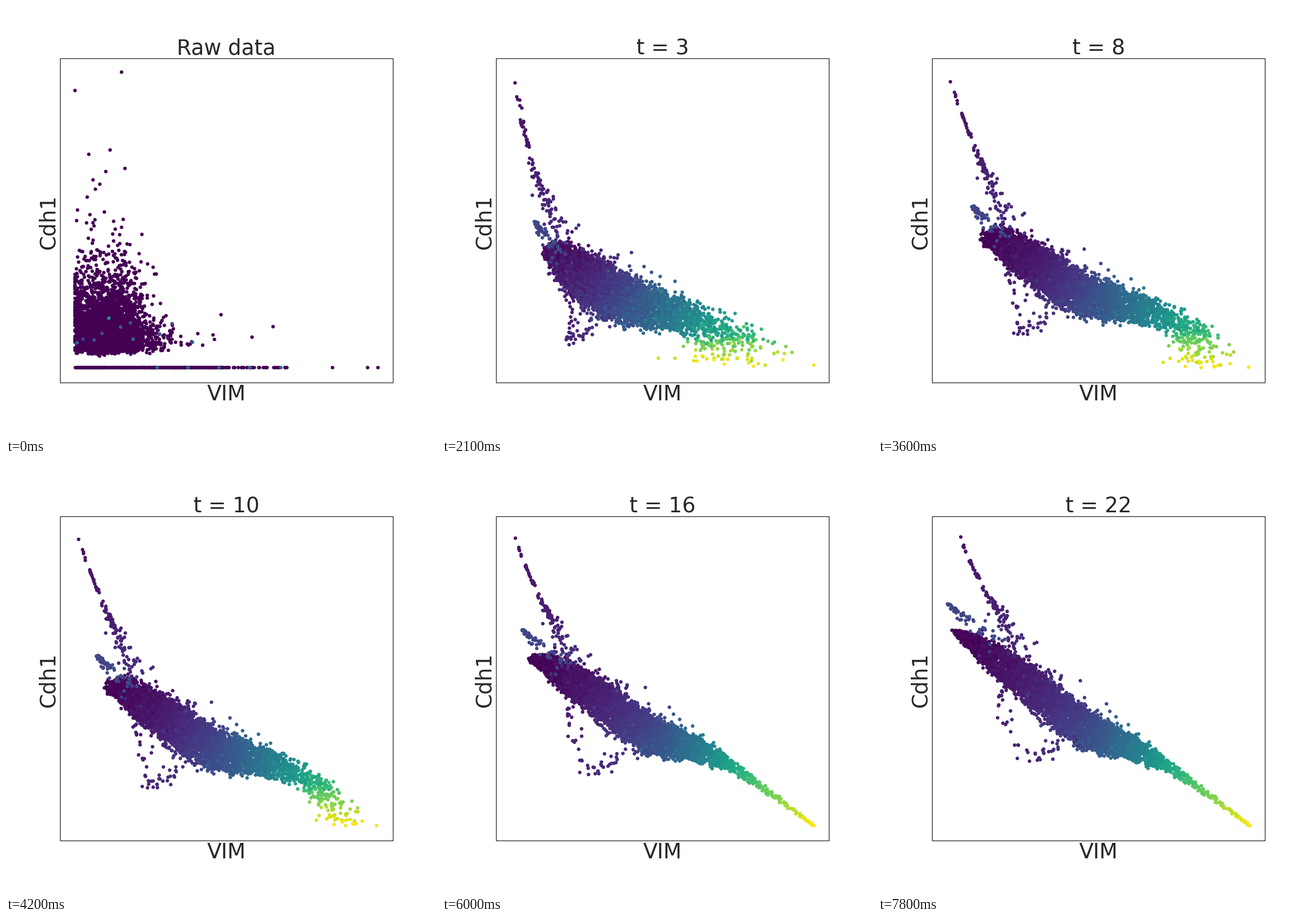
Recreate the animation shown at these times as a matplotlib script. Size 748 by 748 pixels, loop 8 s.

```python
import numpy as np
import matplotlib.pyplot as plt
from matplotlib.animation import FuncAnimation

SIZE, DPI, STEP, FRAMES = 748, 100, 100, 80
LEFT, RIGHT, TOP, BOTTOM = 94, 673, 91, 655
LOW, HIGH = (120, 115), (647, 629)
INK = "#262626"
SETTLED, LAST = 6, 22
rng = np.random.default_rng(7)
viridis = plt.get_cmap("viridis")

# Key points of each strand at three stages: start, settled, last.
BODY = [
    [(163, 405), (178, 450), (210, 490), (262, 518), (345, 545), (425, 578), (425, 614)],
    [(183, 430), (220, 422), (288, 472), (362, 515), (460, 535), (553, 572), (530, 626)],
    [(121, 284), (173, 316), (266, 385), (362, 464), (445, 496), (530, 544), (647, 629)],
]
PLUME = [
    [(126, 115), (130, 235), (140, 320), (160, 380), (185, 425)],
    [(120, 115), (152, 208), (178, 270), (195, 320), (228, 385)],
    [(123, 115), (150, 180), (180, 232), (201, 270), (235, 328)],
]
BRANCH = [
    [(150, 400), (163, 420), (185, 455)],
    [(171, 362), (186, 382), (225, 420)],
    [(121, 242), (153, 269), (215, 312)],
]
SPUR = [
    [(203, 545), (203, 567), (185, 585), (188, 592), (212, 570)],
    [(224, 465), (245, 520), (240, 575), (262, 565), (300, 545)],
    [(219, 388), (212, 432), (255, 508), (288, 503), (318, 487)],
]


def curve(knots, s):
    """Catmull-Rom spline through the knots, s from 0 to 1."""
    k = np.asarray(knots, float)
    p = np.vstack([2 * k[0] - k[1], k, 2 * k[-1] - k[-2]])
    u = s * (len(k) - 1)
    i = np.clip(u.astype(int), 0, len(k) - 2)
    f = (u - i)[:, None]
    a, b, c, d = p[i], p[i + 1], p[i + 2], p[i + 3]
    return b + .5 * f * (c - a + f * (2 * a - 5 * b + 4 * c - d
                                      + f * (3 * (b - c) + d - a)))


def strand(stages, s, widths, noise):
    """Each stage's points: s along the spline, a signed distance across it."""
    out = []
    for knots, w, sigma in zip(stages, widths, noise):
        d = curve(knots, np.minimum(s + .005, 1)) - curve(knots, np.maximum(s - .005, 0))
        normal = np.c_[d[:, 1], -d[:, 0]] / (np.hypot(*d.T)[:, None] + 1e-6)
        jitter = rng.normal(0, sigma, (len(s), 2))
        out.append(curve(knots, s) + normal * w[:, None] + jitter)
    return np.array(out)


def morph(stages, tau):
    """Blend three stages; tau runs from 0 to 2 and may vary per point."""
    a, b, c = stages
    tau = np.reshape(tau, (-1, 1))
    return np.where(tau < 1, a + (b - a) * tau, b + (c - b) * (tau - 1))


def make_body(n=4000, tail=320):
    s = np.r_[rng.beta(3.2, 4.6, n), .5 + .5 * rng.random(tail) ** 1.2]
    rng.shuffle(s)
    m = len(s)
    across = rng.uniform(-.85, .85, m) + rng.normal(0, .15, m)
    across += (rng.random(m) < .05) * rng.exponential(.35, m)
    fan = np.clip(rng.normal(0, 1, m), -1.9, 2)
    tip = s.argmax()
    s[tip], fan[tip] = 1, 2.8
    fan *= np.clip((s - .65) / .3, 0, 1)
    bell = s ** 1.6 * (1 - s) ** 2.2 / .0754
    widths = [across * (size * bell + pad)
              for size, pad in ((36, 14), (28, 11), (32, 1.5))]
    pos = strand(BODY, s, widths, (7, 3, .8))
    pos[:, :, 0] += np.outer((80, 42, 0), fan)
    return s, across, pos


def make_thin(stages, s, width, noise):
    return strand(stages, s, [rng.normal(0, .7, len(s)) * width] * 3, noise)


body_s, across, body = make_body()
tone = rng.normal(0, 1, len(body_s))
blue = .1 * (rng.random(len(body_s)) < .012)
plume_s = rng.random(115) ** .65
plume = make_thin(PLUME, plume_s, .5 + 20 * plume_s ** 2.5, (4, .8, .8))
branch_s = rng.random(60) ** 1.5
branch = make_thin(BRANCH, branch_s, 1 + 11 * branch_s, (5, .8, .8))
spur_s = rng.random(52)
spur = make_thin(SPUR, spur_s, 5 + 5 * spur_s, (8, 2, 2))
spur[:, :14] += (22, -12)
thin_tint = np.r_[.04 + .08 * plume_s,
                  .21 + rng.normal(0, .02, len(branch_s)),
                  .08 + .07 * spur_s ** 2]


def diffused(t):
    early = min(1, np.log(t) / np.log(SETTLED))
    young, late = 1 - early, max(0, t - SETTLED)
    span = LAST - SETTLED
    # The far end of the body comes to rest first.
    body_tau = early + np.minimum(1, late / (span * (1 - body_s / 2)))
    tau = early + late / span
    stem = morph(plume, tau) + (5 * max(0, t - 19), 0)
    pos = np.vstack([morph(body, body_tau), stem, morph(branch, tau), morph(spur, tau)])
    base = .08 * young
    tint = base + (1 - base) * body_s ** 2.2
    tint += blue - .03 * young * across + tone * (.012 + .025 * young)
    tint = np.clip(np.r_[tint, thin_tint], 0, 1)
    return np.clip(pos, LOW, HIGH), viridis(tint)


def raw(n=3500):
    x = 122 + abs(rng.normal(56, 35, n))
    rim = 607 - .06 * abs(x - 172) + rng.normal(0, 2, n)
    height = rng.gamma(1.8, 30, n) * np.interp(x, [120, 210, 270], [1, .95, .6])
    cloud = np.c_[x, rim - height]
    wing = np.c_[260 + rng.exponential(30, 45), 592 - rng.gamma(1.5, 14, 45)]
    zero_x = np.c_[np.full(45, 120), rng.uniform(465, 603, 45)]
    row_x = np.r_[rng.uniform(120, 380, 420), rng.uniform(380, 489, 36), 568, 629, 647]
    row = np.c_[row_x, np.full(len(row_x), 629)]
    stray = np.c_[rng.normal(145, 12, 9), rng.uniform(285, 390, 9)]
    far = [(201, 115), (120, 147), (144, 258), (374, 537), (428, 576)]
    lit = np.vstack([rng.normal((225, 570), (45, 15), (10, 2)),
                     np.c_[np.linspace(263, 478, 5), np.full(5, 629)],
                     [(179, 543)]])
    pos = np.vstack([cloud, wing, zero_x, row, stray, far, lit])
    tint = np.zeros(len(pos))
    tint[-len(lit):] = rng.uniform(.2, .35, len(lit))
    tint[-1] = .5
    return pos, viridis(tint)


states = [raw()] + [diffused(t) for t in range(1, LAST + 1)]

plt.rcParams["font.family"] = "DejaVu Sans"
fig = plt.figure(figsize=(SIZE / DPI, SIZE / DPI), dpi=DPI, facecolor="white")
ax = fig.add_axes([0, 0, 1, 1])
ax.set(xlim=(0, SIZE), ylim=(SIZE, 0))
ax.axis("off")
dots = ax.scatter([], [], s=20, linewidths=0)
ax.add_patch(plt.Rectangle((LEFT, TOP), RIGHT - LEFT, BOTTOM - TOP,
                           fill=False, ec=INK, lw=.9, zorder=3))
label = dict(fontsize=26.5, color=INK, ha="center", va="baseline", rotation_mode="anchor")
mid_x, mid_y = (LEFT + RIGHT) / 2, (TOP + BOTTOM) / 2
title = ax.text(mid_x, 84, "", **label)
ax.text(mid_x, 686, "VIM", **label)
ax.text(84, mid_y + 2, "Cdh1", rotation=90, **label)


def update(i):
    t = max(0, (i * STEP - 1200) // 300)
    pos, colors = states[t]
    dots.set_offsets(pos)
    dots.set_facecolors(colors)
    title.set_text(f"t = {t}" if t else "Raw data")
    return dots, title


anim = FuncAnimation(fig, update, frames=FRAMES, interval=STEP,
                     repeat=True, repeat_delay=0, cache_frame_data=False)
plt.show()
```
